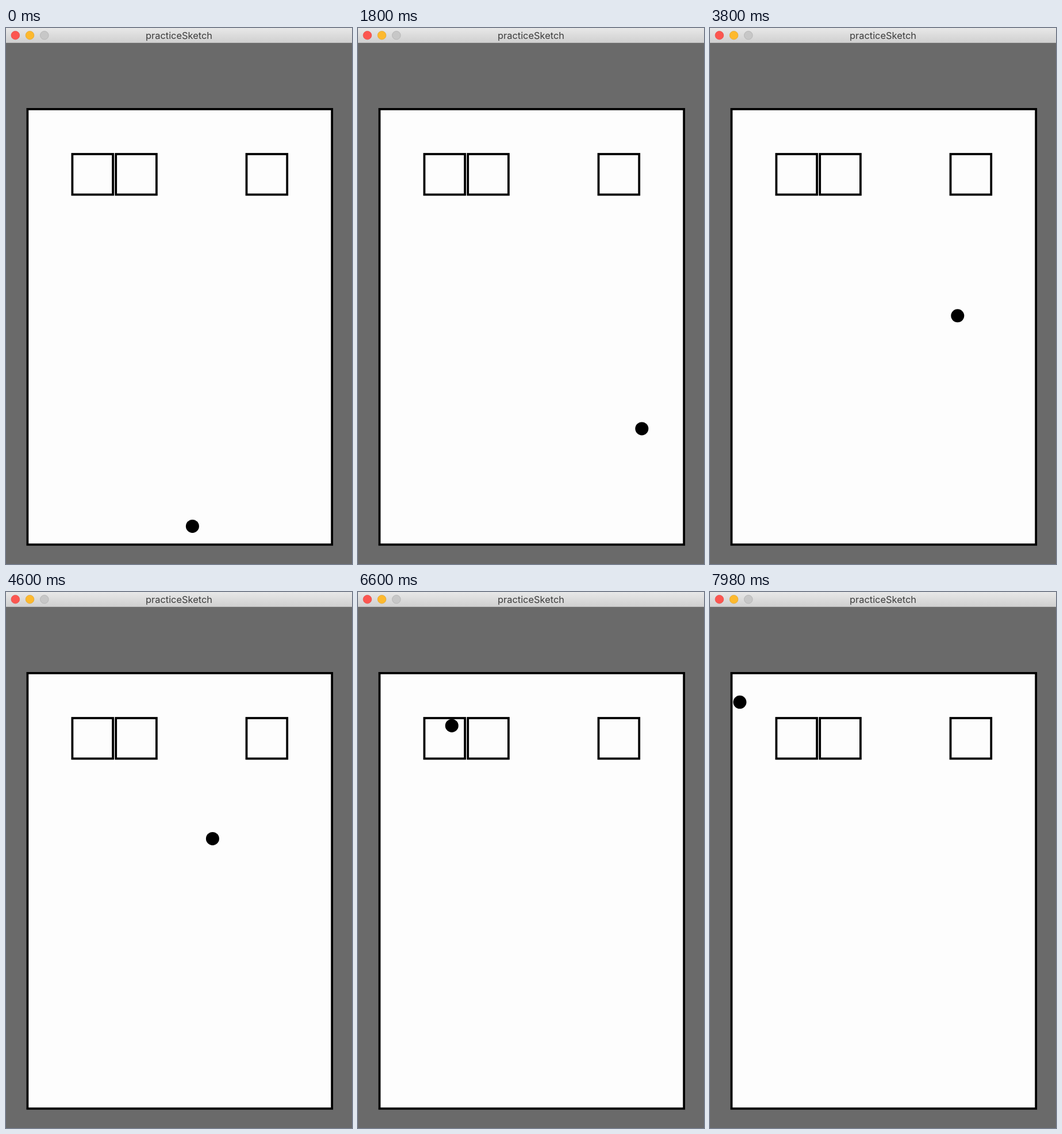
Recreate the animation shown at these times as an HTML page. Size 602 by 931 pixels, loop 8000 ms.

```html
<!DOCTYPE html>
<html lang="en">
<head>
<meta charset="utf-8">
<title>practiceSketch</title>
<style>
  html, body { margin: 0; width: 100%; height: 100%; overflow: hidden; background: #6a6a6a; }
  svg { display: block; width: 602px; height: 931px; }
  .title { font: 16.4px Inter, "Open Sans", sans-serif; fill: #3c3c3c; text-anchor: middle; }
  .box { fill: #fdfdfd; stroke: #000; stroke-width: 3.8; }
</style>
</head>
<body>
<svg viewBox="0 0 602 931">
  <defs>
    <linearGradient id="bar" x2="0" y2="1">
      <stop offset="0" stop-color="#e8e8e8"/>
      <stop offset="1" stop-color="#cfcfcf"/>
    </linearGradient>
    <rect id="tile" class="box" width="70.7" height="70.4"/>
  </defs>

  <rect width="602" height="931" fill="#6a6a6a"/>
  <rect width="602" height="26" fill="url(#bar)"/>
  <rect y="25.2" width="602" height="0.8" fill="#b9b9b9"/>
  <circle cx="16.3" cy="12.7" r="7.3" fill="#fc5650" stroke="#e2453f" stroke-width="0.7"/>
  <circle cx="41.5" cy="12.7" r="7.3" fill="#fdb92e" stroke="#e0a128" stroke-width="0.7"/>
  <circle cx="66.8" cy="12.7" r="7.3" fill="#c7c7c7" stroke="#adadad" stroke-width="0.7"/>
  <text class="title" x="301" y="18.7">practiceSketch</text>

  <rect class="box" x="37.4" y="140.9" width="529.8" height="756.4"/>
  <use href="#tile" x="115.4" y="219"/>
  <use href="#tile" x="191.2" y="219"/>
  <use href="#tile" x="418.5" y="219"/>
  <circle id="ball" r="11.5"/>
</svg>
<script>
  const LOOP = 8000;
  const SPEED = 4.459;
  const LEFT = 42.9, RIGHT = 560.4, TOP = 147.1;
  const START = { x: 324.4, y: 865.4 };
  const ball = document.getElementById('ball');

  // Steps come in threes every 140 ms: held for 20, 20 and 100 ms.
  function stepAt(ms) {
    const t = ms + 20;
    const rest = t % 140;
    return 3 * Math.floor(t / 140) + (rest < 20 ? 0 : rest < 40 ? 1 : 2) - 1;
  }

  // Reflects a coordinate between two walls.
  function bounce(value, min, max) {
    const span = max - min;
    return min + span - Math.abs((value - min) % (2 * span) - span);
  }

  const origin = performance.now();

  function draw() {
    const travel = SPEED * stepAt((performance.now() - origin) % LOOP);
    ball.setAttribute('cx', bounce(START.x + travel, LEFT, RIGHT));
    ball.setAttribute('cy', TOP + Math.abs(START.y - travel - TOP));
    requestAnimationFrame(draw);
  }
  draw();
</script>
</body>
</html>
```
